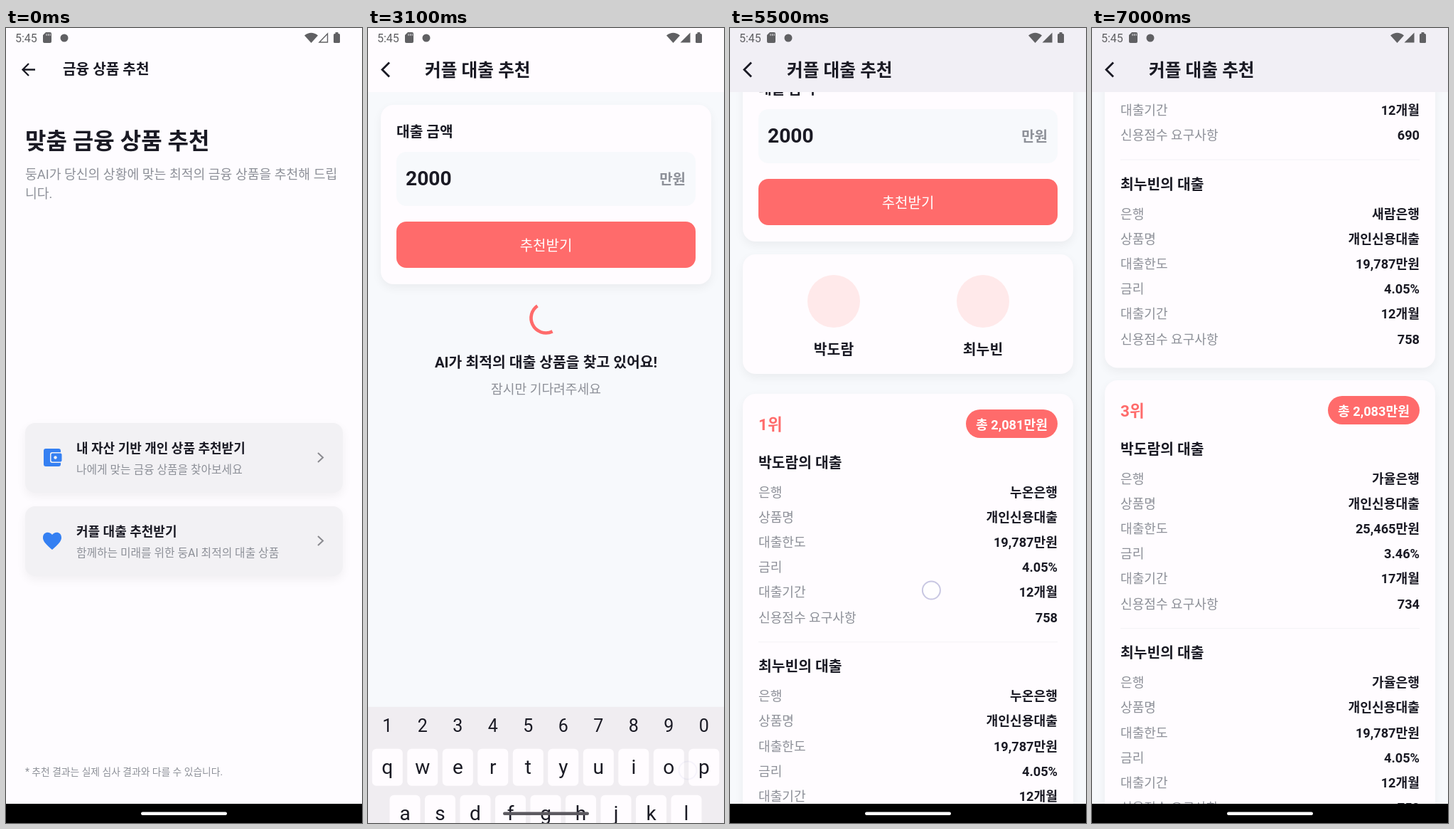
Write an HTML page with a canvas that moves like this. It is 501x1117 px and loops after 7.1 s.

```html
<!DOCTYPE html>
<html lang="ko">
<head>
<meta charset="utf-8">
<title>대출 추천</title>
<style>
html, body { margin: 0; height: 100%; overflow: hidden; background: #fefcff; }
canvas { display: block; }
</style>
</head>
<body>
<canvas id="stage" width="501" height="1117"></canvas>
<script>
const W = 501, H = 1117, LOOP = 7100, STEP = 100;
const INK = '#1a1a24', GREY = '#8d9098', CORAL = '#ff6b6b', CARD = '#fffcff', PAGE = '#f7f9fc',
      BLUE = '#3580f2', STATUS = '#606063', KEYBOARD = '#f0edf1';
const PEOPLE = ['박도람', '최누빈'];
const LABELS = ['은행', '상품명', '대출한도', '금리', '대출기간', '신용점수 요구사항'];
const STANDARD = ['19,787만원', '4.05%', '12개월', '758'];
const RANKS = [
  { bank: '누온은행', total: '2,081', first: STANDARD },
  { bank: '새람은행', total: '2,082', first: ['14,924만원', '4.56%', '12개월', '690'] },
  { bank: '가율은행', total: '2,083', first: ['25,465만원', '3.46%', '17개월', '734'] },
];
// Scroll offset every 100 ms from 5400 ms on: two swipes, each with a fling.
const SCROLL = [0, 60, 180, 310, 421, 490, 535, 563, 580, 660, 828, 1040, 1215, 1340, 1396];
// Touches: press, release, from x y, to x y.
const TOUCHES = [
  [100, 330, 300, 725, 300, 725], [1000, 1150, 137, 217, 137, 217],
  [1600, 1720, 76, 790, 76, 790], [2000, 2110, 472, 790, 472, 790],
  [2300, 2410, 472, 790, 472, 790], [2500, 2610, 472, 790, 472, 790],
  [2800, 3015, 450, 1043, 450, 1043],
  [5450, 5850, 282, 850, 293, 370], [6200, 6330, 300, 578, 303, 330],
];
const c = document.getElementById('stage').getContext('2d');

const clamp = (v, a = 0, b = 1) => Math.min(b, Math.max(a, v));
const progress = (t, a, b) => clamp((t - a) / (b - a));
const smooth = k => k * k * (3 - 2 * k);
const mix = (a, b, k) => a + (b - a) * k;

function text(s, x, y, size, color = INK, weight = 400, align = 'left') {
  c.font = `${weight} ${size}px Roboto, "Noto Sans CJK KR", "Noto Sans CJK", sans-serif`;
  c.textAlign = align;
  c.fillStyle = color;
  c.fillText(s, x, y + size * 0.365);
}
function box(x, y, w, h, r, color) {
  c.beginPath();
  c.roundRect(x, y, w, h, r);
  c.fillStyle = color;
  c.fill();
}
function card(x, y, w, h, r, color) {
  c.save();
  c.shadowColor = 'rgba(0,0,0,.055)';
  c.shadowBlur = 14;
  c.shadowOffsetY = 5;
  box(x, y, w, h, r, color);
  c.restore();
}
function circle(x, y, r, color) {
  c.beginPath();
  c.arc(x, y, r, 0, 2 * Math.PI);
  c.fillStyle = color;
  c.fill();
}
function shape(d, color) {
  c.fillStyle = color;
  c.fill(new Path2D(d));
}
function line(d, color, width) {
  c.strokeStyle = color;
  c.lineWidth = width;
  c.stroke(new Path2D(d));
}

function statusBar(t) {
  text('5:45', 13, 14.5, 16, STATUS);
  shape('M56 6H62Q64 6 64 8V19Q64 21 62 21H54Q52 21 52 19V10Z', STATUS);
  line('M57 8V11M59.5 8V11M62 8V11', '#dddce0', 1);
  circle(82, 14, 5.5, STATUS);
  shape('M420 10.5Q429.500 3 439 10.500L429.500 21Z', STATUS);
  if (t < 300) line('M452.500 8V20H441Z', STATUS, 1.4);
  else shape('M453.500 6.500V20.500H439.500Z', STATUS);
  box(461, 8, 9, 13, 1.5, STATUS);
  box(463.5, 6, 4, 3, 0, STATUS);
}

function choice(y, title, note) {
  card(27, y, 447, 98, 14, '#f2f1f4');
  text(title, 99, y + 35, 18, INK, 600);
  text(note, 99, y + 65, 15.8, GREY);
  line(`M439 ${y + 42}L446 ${y + 48.5}L439 ${y + 55}`, '#8a8a8f', 2);
}
function home(t) {
  box(0, 0, W, H, 0, '#fefcff');
  line('M41 58.5H24M32 50L23.500 58.500L32 67', INK, 2.3);
  text('금융 상품 추천', 80, 58, 20.2, INK, 600);
  text('맞춤 금융 상품 추천', 27, 158, 32, INK, 600);
  text('둥AI가 당신의 상황에 맞는 최적의 금융 상품을 추천해 드립', 27, 205, 18.25, GREY);
  text('니다.', 27, 232, 18.25, GREY);
  choice(555, '내 자산 기반 개인 상품 추천받기', '나에게 맞는 금융 상품을 찾아보세요');
  choice(672, '커플 대출 추천받기', '함께하는 미래를 위한 둥AI 최적의 대출 상품');
  if (t >= 200 && t < 500) box(27, 672, 447, 98, 14, 'rgba(0,0,0,.03)');
  box(53, 591, 24, 25, 3, BLUE);
  box(62, 596, 17, 15, 3, '#f2f1f4');
  box(63.5, 597.5, 15, 12, 2, BLUE);
  circle(69.5, 603.5, 2.2, '#f2f1f4');
  shape('M65 733C53 723 52 719 52 716C52 707 62 707 65 712C68 707 78 707 78 716C78 719 77 723 65 733Z', BLUE);
  text('* 추천 결과는 실제 심사 결과와 다를 수 있습니다.', 27, 1045, 13.8, GREY);
}

function form(t) {
  card(18, 108, 465, 252, 18, CARD);
  text('대출 금액', 40, 146, 20.3, INK, 600);
  box(40, 174, 421, 76, 14, PAGE);
  const digits = [1700, 2100, 2400, 2600].filter(at => t >= at).length;
  const amount = '2000'.slice(0, digits);
  text(amount || '0', 53, 211, 28.2, digits ? INK : '#46464e', 700);
  if (t >= 1100 && t < 2900 && t % 400 < 200) {
    const x = 54 + (digits ? c.measureText(amount).width : 0);
    box(x, 192, 2.2, 40, 1, '#5b5298');
  }
  if (t >= 1400) text('만원', 447, 213, 20, GREY, 600, 'right');
  box(40, 272, 421, 65, 14, CORAL);
  text('추천받기', 250.5, 306, 20, '#fff', 400, 'center');
}
function prompt() {
  c.beginPath();
  c.arc(241, 421.5, 20.7, 0, 2 * Math.PI);
  c.strokeStyle = CORAL;
  c.lineWidth = 6.8;
  c.stroke();
  line('M255 436L279 460', CORAL, 8);
  text('대출 금액을 입력하고', 250.5, 519, 20.4, INK, 600, 'center');
  text('추천받기 버튼을 눌러주세요', 250.5, 549, 20.4, INK, 600, 'center');
}

// Cubic ease (0.4, 0, 0.2, 1), solved by bisection.
function ease(x) {
  let lo = 0, hi = 1;
  for (let i = 0; i < 20; i++) {
    const s = (lo + hi) / 2;
    if (1.2 * s * (1 - s) ** 2 + 0.6 * s * s * (1 - s) + s ** 3 < x) lo = s; else hi = s;
  }
  return lo * lo * (3 - 2 * lo);
}
function spinner(t) {
  const e = 2200 + 2.514 * (t - 3100), phase = e / 1333.2 % 1, turn = e / 2222 % 1;
  const head = ease(clamp(phase * 2)), tail = ease(clamp(phase * 2 - 1));
  const start = Math.PI * (-0.5 + 1.5 * tail + 2 * turn + 0.5 * phase);
  c.beginPath();
  c.arc(250.5, 407.5, 21, start, start + Math.max(0.02, 1.5 * Math.PI * (head - tail)));
  c.strokeStyle = CORAL;
  c.lineWidth = 4.6;
  c.stroke();
  text('AI가 최적의 대출 상품을 찾고 있어요!', 250.5, 470, 20.4, INK, 600, 'center');
  text('잠시만 기다려주세요', 250.5, 507, 18.2, GREY, 400, 'center');
}

function loan(y, person, values) {
  text(person + '의 대출', 40, y, 20.4, INK, 600);
  LABELS.forEach((label, i) => {
    const rowY = y + 41.5 + i * 35.2;
    text(label, 40, rowY, 18.1, GREY);
    text(values[i], 461, rowY, 18.2, INK, 600, 'right');
  });
}
function results() {
  card(18, 378, 465, 168, 18, CARD);
  PEOPLE.forEach((name, i) => {
    const x = 146 + i * 210;
    circle(x, 444, 37, '#ffe9ea');
    text(name, x, 512, 20.4, INK, 600, 'center');
  });
  RANKS.forEach(({ bank, total, first }, i) => {
    const y = 574 + i * 658.5;
    card(18, y, 465, 641, 18, CARD);
    text(i + 1 + '위', 40, y + 43, 22.5, CORAL, 600);
    box(332, y + 22, 129, 40, 20, CORAL);
    text(`총 ${total}만원`, 396.5, y + 43, 18.2, '#fff', 600, 'center');
    loan(y + 96.5, PEOPLE[0], [bank, '개인신용대출', ...first]);
    box(40, y + 348, 421, 1.2, 0, '#f5f4f7');
    loan(y + 383, PEOPLE[1], [bank, '개인신용대출', ...STANDARD]);
  });
}
function couple(t, scroll) {
  box(0, 0, W, H, 0, PAGE);
  c.save();
  c.translate(0, -scroll);
  form(t);
  if (t < 2900) prompt();
  else if (t < 5000) spinner(t);
  else results();
  c.restore();
  box(0, 0, W, 90, 0, scroll ? '#f1eff5' : CARD);
  line('M30 48.500L20 58.500L30 68.500', INK, 2.8);
  text('커플 대출 추천', 80, 59, 24.7, INK, 600);
}

function key(label, x, y, w = 43, color = CARD, size = 28) {
  box(x - w / 2, y - 26, w, 52, 6, color);
  text(label, x, y - 1, size, INK, 400, 'center');
}
function keyboard(t, shift) {
  c.save();
  c.translate(0, 764 + shift);
  box(0, 0, W, 353, 0, KEYBOARD);
  [...'1234567890'].forEach((d, i) => {
    const x = 27.3 + i * 49.5;
    const pressed = TOUCHES.some(([a, b, tx, ty]) => ty === 790 && t >= a && t <= b && Math.abs(tx - x) < 20);
    if (pressed) box(x - 22, 2, 44, 50, 6, '#dcd8e0');
    text(d, x, 26, 25, INK, 400, 'center');
  });
  ['qwertyuiop', 'asdfghjkl', 'zxcvbnm'].forEach((row, r) =>
    [...row].forEach((ch, i) => key(ch, [27.3, 52, 101.5][r] + i * 49.5, 85 + r * 65)));
  const soft = '#dfdce4';
  key('⇧', 40, 215, 68, soft, 24);
  key('⌫', 461, 215, 68, soft, 22);
  key('?123', 40, 280, 68, soft, 19);
  key(',', 102, 280, 43, soft);
  key('', 250, 280, 242);
  key('.', 399, 280, 43, soft);
  key('✓', 461, 280, 68, '#d5d0ee', 24);
  c.restore();
}

function touch(t, [press, release, x0, y0, x1, y1]) {
  const alpha = t < press ? 0 : 1 - progress(t, release, release + 100);
  if (!alpha) return;
  const k = progress(t, press, release);
  circle(mix(x0, x1, k), mix(y0, y1, k), 12.5, `rgba(255,255,255,${0.6 * alpha})`);
  c.strokeStyle = `rgba(110,110,180,${0.38 * alpha})`;
  c.lineWidth = 2;
  c.stroke();
}

function draw(t) {
  const enter = smooth(progress(t, 640, 860));
  const scroll = SCROLL[clamp(Math.round((t - 5400) / STEP), 0, SCROLL.length - 1)];
  if (enter < 1) home(t);
  if (enter > 0) {
    const scale = mix(0.9, 1, enter);
    c.save();
    c.globalAlpha = enter;
    c.translate(W / 2 * (1 - scale), H / 2 * (1 - scale));
    c.scale(scale, scale);
    couple(t, scroll);
    c.restore();
  }
  statusBar(t);
  box(0, 1090, W, 27, 0, '#000');
  const open = smooth(progress(t, 1250, 1450)) * (1 - smooth(progress(t, 2995, 3195)));
  if (open > 0) keyboard(t, 353 * (1 - open));
  box(190, 1101.5, 121, 4.5, 2.2, open > 0.1 ? '#5c5a60' : '#fff');
  TOUCHES.forEach(item => touch(t, item));
}

function tick() {
  draw(Math.floor(performance.now() % LOOP / STEP) * STEP);
  requestAnimationFrame(tick);
}
tick();
</script>
</body>
</html>
```
